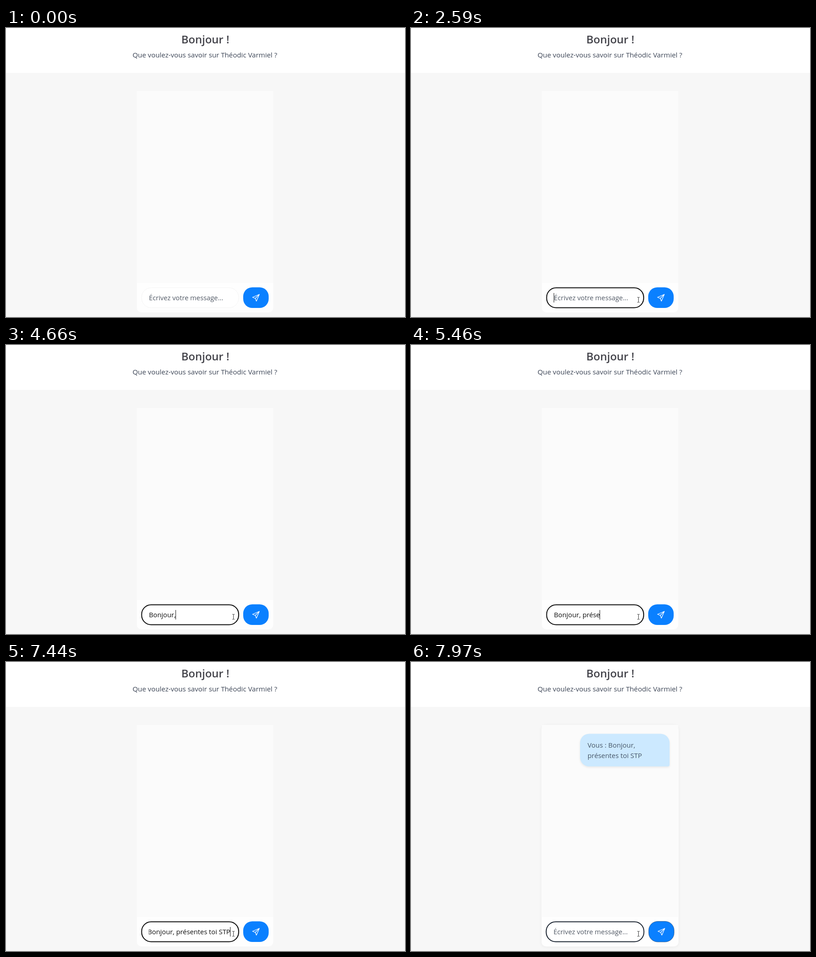
An HTML page that plays this animation: 878 by 638 pixels, repeating every 8000 ms.

```html
<!DOCTYPE html>
<html lang="fr">
<head>
<meta charset="utf-8">
<title>Chat</title>
<style>
  html, body { margin: 0; height: 100%; overflow: hidden; background: #f7f7f7; }
  svg { display: block; width: 100vw; height: 100vh; }
  text { font: 14.8px "Open Sans", "Noto Sans", sans-serif; white-space: pre; }
  #panel { filter: drop-shadow(0 1px 3px rgba(0, 0, 0, .05)); }
  #bubble { filter: drop-shadow(0 2px 2px rgba(0, 0, 0, .08)); }
</style>
</head>
<body>
<svg viewBox="0 0 878 638">
  <defs>
    <clipPath id="field"><rect x="314" y="580" width="182" height="30"/></clipPath>
  </defs>
  <rect width="878" height="638" fill="#f7f7f7"/>
  <rect width="878" height="99" fill="#fff"/>
  <text x="438.5" y="34" text-anchor="middle" fill="#43434a" style="font-size:24px;font-weight:600">Bonjour !</text>
  <text x="278.5" y="65" fill="#3b4455" style="font-size:15.2px">Que voulez-vous savoir sur Théodic Varmiel ?</text>

  <rect id="panel" x="287" y="139" width="302" height="489" rx="10" fill="#fbfbfb"/>
  <rect x="288" y="139" width="300" height="424" fill="#fbfbfb"/>
  <path d="M288 563h300v55a10 10 0 0 1-10 10h-280a10 10 0 0 1-10-10z" fill="#fefefe"/>

  <g id="bubble">
    <path d="M392 158.5h157a20 20 0 0 1 20 20v48a4 4 0 0 1-4 4h-173a20 20 0 0 1-20-20v-32a20 20 0 0 1 20-20z" fill="#cce9ff"/>
    <text x="388.5" y="189" fill="#465668" style="font-size:14.9px">Vous : Bonjour,</text>
    <text x="388.5" y="212" fill="#465668" style="font-size:14.9px">présentes toi STP</text>
  </g>

  <rect id="input" y="573.5" height="44" rx="21" fill="#fff"/>
  <text id="hint" y="601" fill="#525a66">Écrivez votre message...</text>
  <g clip-path="url(#field)"><text id="typed" y="601" fill="#111"></text></g>
  <rect id="caret" y="585" width="1" height="21" fill="#111"/>

  <g id="button">
    <rect id="face" x="522" y="572.5" width="56" height="45.5" rx="20" fill="#0a80ff"/>
    <path d="M557.5 588L542.5 594.5L548.5 597L551 603ZL548.5 597" fill="none" stroke="#fff" stroke-width="1.3" stroke-linejoin="round"/>
  </g>

  <path id="arrow" d="M0 0v14l3.3-3 2.2 5 2.2-1-2.2-4.8h4.5z" fill="#fff" stroke="#222" stroke-width=".9"/>
  <path id="beam" d="M-2.5-5.5h2l.5.5.5-.5h2M0-5v10M-2.5 5.5h2l.5-.5.5.5h2" fill="none" stroke="#333"/>
</svg>
<script>
const LOOP = 8000, FOCUS = 465, TYPE = 3320, SEND = 7840, BLINK = 530;
const MESSAGE = "Bonjour, présentes toi STP";
// Each entry is [time, number of characters typed].
const keys = [
  [3320, 1], [3520, 2], [3720, 3], [4190, 4], [4320, 5], [4520, 7],
  [4660, 8], [4790, 9], [4920, 10], [4990, 11], [5120, 12], [5320, 13],
  [5460, 14], [5590, 15], [5720, 16], [5790, 17],
  [5990, 18], [6120, 19], [6250, 20], [6380, 21], [6450, 22], [6580, 23],
  [6980, 24], [7310, 25], [7440, 26]
];
// Pointer path: [time, x, y].
const path = [[70, 656, 624], [268, 527, 626], [400, 478, 607]];

const $ = id => document.getElementById(id);
const set = (id, attrs) => {
  for (const k in attrs) $(id).setAttribute(k, attrs[k]);
};
const show = (id, on) => set(id, { visibility: on ? "visible" : "hidden" });

function pointerAt(t) {
  if (t >= 730) return [500.5, 600];
  const q = 70 + Math.floor((t - 70) / 66) * 66;
  for (let i = 1; i < path.length; i++) {
    const [t0, x0, y0] = path[i - 1], [t1, x1, y1] = path[i];
    if (q < t1) {
      const k = (q - t0) / (t1 - t0);
      return [x0 + (x1 - x0) * k, y0 + (y1 - y0) * k];
    }
  }
  return path[path.length - 1].slice(1);
}

function draw(t) {
  const sent = t >= SEND, focused = t >= FOCUS;
  const typing = t >= TYPE && !sent;

  const [px, py] = pointerAt(t);
  const overInput = px < 512;
  const place = `translate(${px} ${py})`;
  show("arrow", t >= 70 && !overInput);
  show("beam", t >= 70 && overInput);
  set("arrow", { transform: place });
  set("beam", { transform: place });

  show("panel", sent);
  show("bubble", sent);
  set("bubble", { opacity: t < 7970 ? .6 : 1 });

  set("input", {
    x: sent ? 297.5 : 298.5, width: sent ? 215 : 213.5,
    stroke: sent ? "#1b2431" : focused ? "#0b0b0b" : "#f4f4f4",
    "stroke-width": focused ? 2 : 1
  });
  set("button", { transform: `translate(${sent ? 1 : 0} 0)` });
  set("face", { stroke: sent ? "#28466b" : "none", "stroke-width": .7 });

  show("hint", !typing);
  set("hint", { x: sent ? 313.5 : 314.5 });

  let count = 0;
  if (typing) for (const [at, n] of keys) if (t >= at) count = n;
  const typed = $("typed");
  typed.textContent = MESSAGE.slice(0, count);
  const width = count ? typed.getComputedTextLength() : 0;
  const scroll = Math.max(0, width - 179);
  set("typed", { x: 314.5 - scroll });

  const blinkOn = Math.floor((t - FOCUS) / BLINK) % 2 === 0;
  show("caret", typing || (focused && !sent && blinkOn));
  set("caret", { x: Math.round(314 + width - scroll) });
}

function frame() {
  draw(performance.now() % LOOP);
  requestAnimationFrame(frame);
}
frame();
</script>
</body>
</html>
```
